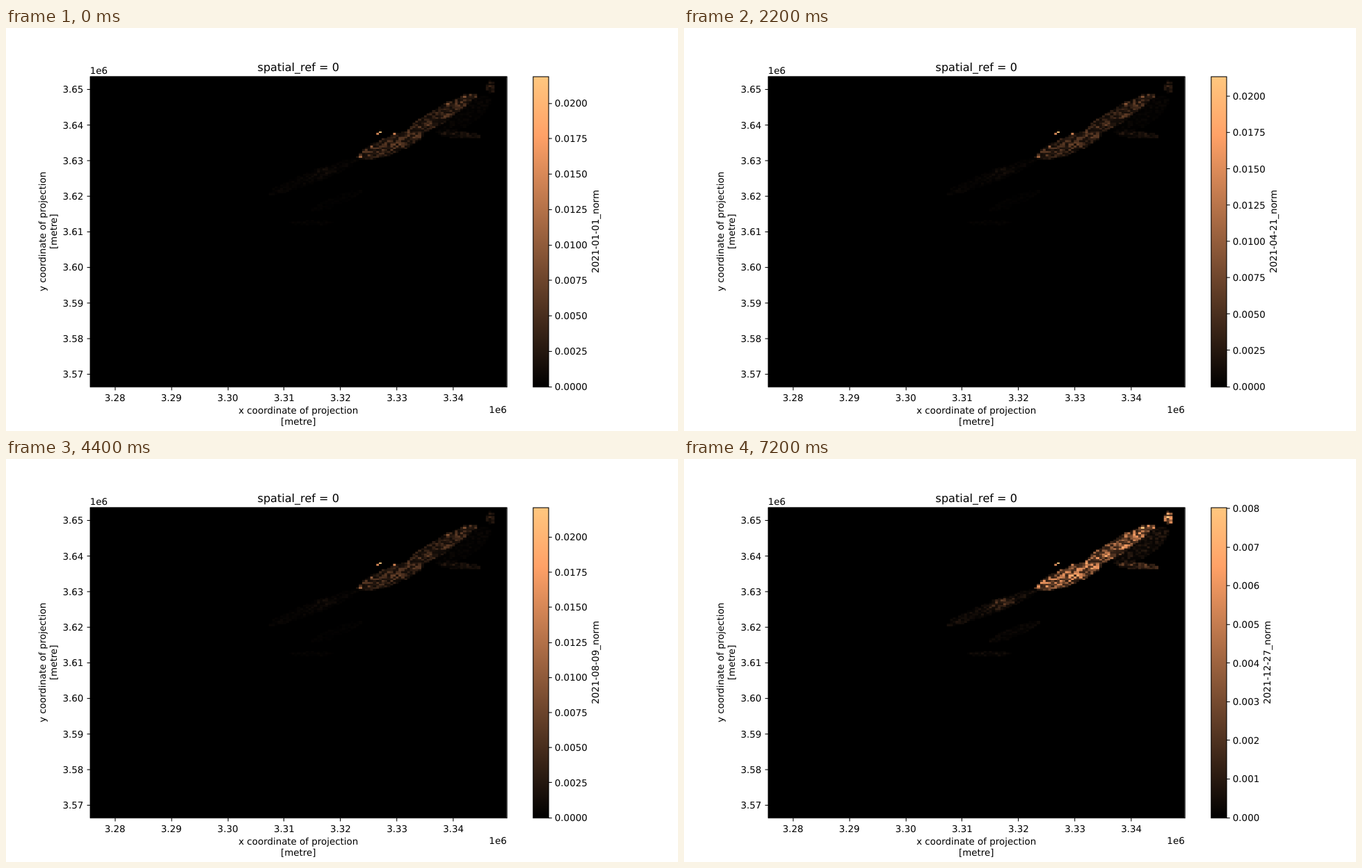
These frames come from a looping animation (966x580 px, 7400 ms). An HTML page with a canvas:

```html
<!DOCTYPE html>
<html lang="en">
<head>
<meta charset="utf-8">
<title>Raster time series</title>
<style>
html, body { margin: 0; width: 100%; height: 100%; overflow: hidden; background: #fff; }
canvas, svg { position: absolute; left: 0; top: 0; width: 966px; height: 580px; }
text { font: 13.89px "DejaVu Sans", sans-serif; text-rendering: geometricPrecision; }
.title { font-size: 16.67px; }
.mid { text-anchor: middle; }
.end { text-anchor: end; }
.line { fill: none; stroke: #000; stroke-width: 1.11; }
</style>
</head>
<body>
<canvas id="map" width="1000" height="600"></canvas>
<svg viewBox="0 0 1000 600" preserveAspectRatio="none">
  <defs>
    <linearGradient id="copper" x1="0" y1="1" x2="0" y2="0">
      <stop offset="0" stop-color="#000"/>
      <stop offset=".81" stop-color="rgb(255,161,103)"/>
      <stop offset="1" stop-color="rgb(255,199,127)"/>
    </linearGradient>
  </defs>
  <rect class="line" x="125.5" y="72.5" width="620" height="462"/>
  <rect class="line" x="784.5" y="72.5" width="23" height="462" style="fill:url(#copper)"/>
  <text class="title mid" x="435" y="64">spatial_ref = 0</text>
  <text x="125" y="68">1e6</text>
  <text class="end" x="745" y="573">1e6</text>
  <text class="mid" x="435" y="574.5">x coordinate of projection</text>
  <text class="mid" x="435" y="591">[metre]</text>
  <text class="mid" transform="translate(59.5 303) rotate(-90)">y coordinate of projection</text>
  <text class="mid" transform="translate(76 303) rotate(-90)">[metre]</text>
  <g id="axes"></g>
  <g id="scale"></g>
</svg>
<script>
const STEP = 200, COUNT = 37;
const LEFT = 125, TOP = 72, WIDTH = 620, HEIGHT = 462, BOTTOM = TOP + HEIGHT;
const COLS = 148, ROWS = 175, CELL_W = WIDTH / COLS, CELL_H = HEIGHT / ROWS;
const SPRING = 8, LAST = 36;
const ctx = document.getElementById('map').getContext('2d');
const axes = document.getElementById('axes');
const scale = document.getElementById('scale');

// Key points of the colour-scale maximum: step, value
const MAXIMA = [[0, .0219], [SPRING, .02034], [14, .0224], [18, .0224], [19, .02188],
  [26, .02246], [32, .02295], [35, .0229], [LAST, .00803]];

// Slanted ellipses of brightness; boost applies in spring and at the year's end
const patch = (x1, y1, x2, y2, half, level, boost = 1) => ({ x1, y1, x2, y2, half, level, boost });
const RIDGE = [
  patch(523, 192, 622, 157, 14, .17),
  patch(588, 163, 697, 101, 14, .17)
];
const PATCHES = [
  ...RIDGE,
  patch(676, 104, 701, 101, 3, .25),
  patch(715, 88, 727, 88, 10, .1, 2.2),
  patch(640, 156, 706, 162, 6, .07),
  patch(640, 150, 722, 108, 20, .02, 1.4),
  patch(390, 247, 526, 196, 10, .02),
  patch(454, 218, 494, 212, 9, .04, 1.5),
  patch(455, 271, 530, 243, 8, .011),
  patch(422, 290, 488, 290, 4, .014)
];
const PEAKS = [[557, 154, 1], [553, 157, .65], [578, 157, .65], [528, 191, .6]];

const noise = (a, b) => {
  const n = Math.sin(a * 127.1 + b * 311.7) * 43758.5453;
  return n - Math.floor(n);
};

function maximum(step) {
  const i = Math.max(1, MAXIMA.findIndex(([k]) => k >= step));
  const [k0, v0] = MAXIMA[i - 1], [k1, v1] = MAXIMA[i];
  return v0 + (v1 - v0) * (step - k0) / (k1 - k0);
}

// Signed height within a patch: -1 at its upper edge, 1 at its lower edge
function depth({ x1, y1, x2, y2, half }, x, y) {
  const t = (x - x1) / (x2 - x1);
  if (t <= 0 || t >= 1) return 2;
  return (y - y1 - (y2 - y1) * t) / (half * Math.sqrt(4 * t * (1 - t)));
}

function paint(col, row, v) {
  const x = Math.round(LEFT + (col - .4) * CELL_W), y = Math.round(TOP + row * CELL_H);
  const w = Math.round(LEFT + (col + .6) * CELL_W) - x;
  const h = Math.round(TOP + (row + 1) * CELL_H) - y;
  const rgb = [1.2346, .7812, .4975].map(k => Math.round(255 * Math.min(1, k * Math.min(1, v))));
  ctx.fillStyle = `rgb(${rgb})`;
  ctx.fillRect(x, y, w, h);
}

function drawMap(step, max) {
  const gain = .022 / max, boosted = step === SPRING || step === LAST;
  ctx.fillStyle = '#000';
  ctx.fillRect(LEFT, TOP, WIDTH, HEIGHT);
  for (let c = 0; c < COLS; c++) {
    for (let r = 0; r < ROWS; r++) {
      const x = LEFT + (c + .1) * CELL_W, y = TOP + (r + .5) * CELL_H;
      const grain = .35 + 1.6 * noise(c, r) ** 2;
      let v = 0;
      for (const p of PATCHES) {
        const d = depth(p, x, y);
        if (Math.abs(d) >= 1) continue;
        const level = p.level * (boosted ? p.boost : 1) * gain;
        const spark = step < LAST && RIDGE.includes(p) && d < -.7 && noise(r, c) > .85 ? 2.2 : 1;
        v = Math.max(v, level * grain * spark * Math.sqrt(1 - d * d * .8));
      }
      if (v > .004) paint(c, r, v);
    }
  }
  for (const [x, y, v] of PEAKS) {
    paint(Math.round((x - LEFT) / CELL_W), Math.floor((y - TOP) / CELL_H), v);
  }
}

const label = (x, y, str, cls = '') => `<text class="${cls}" x="${x}" y="${y}">${str}</text>`;
const tick = d => `<path class="line" d="${d}"/>`;
const snap = v => Math.floor(v) + .5;

function drawAxes() {
  let out = '';
  for (let i = 0; i < 7; i++) {
    const x = 162.1 + 83.95 * i;
    out += tick(`M${snap(x)} 534.5v4.86`) + label(x, 555, (3.28 + i / 100).toFixed(2), 'mid');
  }
  for (let i = 0; i < 9; i++) {
    const y = 91.5 + 53 * i;
    out += tick(`M125.5 ${snap(y)}h-4.86`) + label(115.3, y + 5, (3.65 - i / 100).toFixed(2), 'end');
  }
  axes.innerHTML = out;
}

function drawScale(step, max) {
  const gap = [.001, .002, .0025, .005].find(g => max / 9 <= g);
  const digits = gap === .0025 ? 4 : 3;
  let out = '';
  for (let v = 0; v <= max; v += gap) {
    const y = BOTTOM - v / max * HEIGHT;
    out += tick(`M807.5 ${snap(y)}h4.86`) + label(816.6, y + 5, v.toFixed(digits));
  }
  const day = new Date(Date.UTC(2021, 0, 1 + 10 * step)).toISOString().slice(0, 10);
  const x = digits === 4 ? 881.5 : 872.7;
  out += `<text class="mid" transform="translate(${x} 303) rotate(-90)">${day}_norm</text>`;
  scale.innerHTML = out;
}

let shown = -1;
function update() {
  const step = Math.floor(performance.now() / STEP) % COUNT;
  if (step !== shown) {
    shown = step;
    const max = maximum(step);
    drawMap(step, max);
    drawScale(step, max);
  }
  requestAnimationFrame(update);
}

drawAxes();
update();
</script>
</body>
</html>
```
